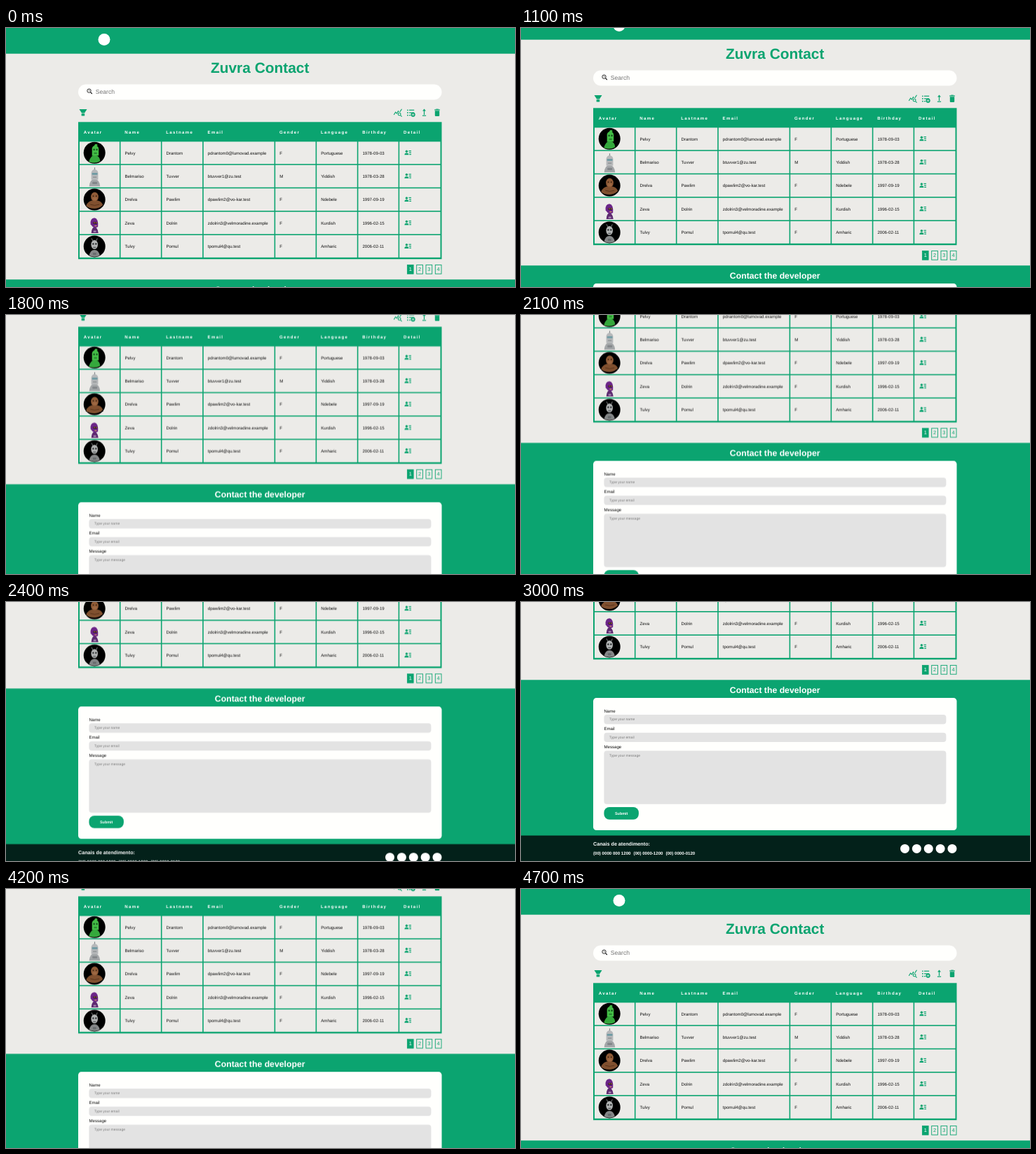
An HTML page that plays this animation: 726x370 px, repeating every 5500 ms.

```html
<!DOCTYPE html>
<html lang="en">
<head>
<meta charset="utf-8">
<title>Contact list</title>
<style>
  html, body { margin: 0; width: 100%; height: 100%; overflow: hidden; background: #ecebe8; }
  svg { display: block; width: 726px; height: 370px; overflow: hidden; }
  text { font-family: "Liberation Sans", Arial, sans-serif; text-rendering: geometricPrecision; white-space: pre; }
</style>
</head>
<body>
<svg viewBox="0 0 726 370"><g id="page"></g></svg>
<script>
const GREEN = '#0ba470', PAPER = '#ecebe8', WHITE = '#fffffd', INK = '#111';
const LEFT = 103, RIGHT = 621.5, WIDTH = RIGHT - LEFT;

const rect = (x, y, w, h, fill, r = 0, extra = '') =>
  `<rect x="${x}" y="${y}" width="${w}" height="${h}" rx="${r}" fill="${fill}" ${extra}/>`;
const oval = (x, y, rx, ry, fill) =>
  `<ellipse cx="${x}" cy="${y}" rx="${rx}" ry="${ry}" fill="${fill}"/>`;
const dot = (x, y, r, fill) => oval(x, y, r, r, fill);
const ring = (x, y, r, color, w) =>
  `<circle cx="${x}" cy="${y}" r="${r}" fill="none" stroke="${color}" stroke-width="${w}"/>`;
const fillPath = (d, fill) => `<path d="${d}" fill="${fill}"/>`;
const linePath = (d, color, w) =>
  `<path d="${d}" fill="none" stroke="${color}" stroke-width="${w}"/>`;
const text = (x, y, size, str, fill = INK, extra = '') =>
  `<text x="${x}" y="${y}" font-size="${size}" fill="${fill}" ${extra}>${str}</text>`;
const at = (x, y, content, scale = 1) =>
  `<g transform="translate(${x} ${y}) scale(${scale})">${content}</g>`;
const BOLD = 'font-weight="700" ', MID = 'text-anchor="middle"';

function header() {
  return rect(0, 0, 726, 36.7, GREEN) +
    dot(140, 16.5, 8.5, '#fff') +
    text(362.2, 64.3, 20.9, 'Zuvra Contact', GREEN, BOLD + MID);
}

function searchBar() {
  return rect(LEFT, 80.5, WIDTH, 22, WHITE, 11) +
    ring(118.5, 89.7, 2.7, INK, 0.9) +
    linePath('M120.5 91.7L122.8 94', INK, 1.1) +
    linePath('M117.5 89.3Q118.7 88.1 119.5 89.4L118.6 90.8', INK, 0.5) +
    text(127.8, 94.4, 8.6, 'Search', '#757575');
}

function toolbar() {
  const funnel = fillPath('M104.5 116H115.5L112 121.6H108Z', GREEN) +
    rect(107.6, 122.2, 4.6, 3.3, GREEN, 0.5);
  const stats = at(552.3, 114.3,
    linePath('M1.8 17.5L6 10.7L9.2 14.2L13 7.9L14.9 10.3M17.3 10.2L22.2 2.6', GREEN, 2) +
    ring(16, 16, 3.5, GREEN, 2) +
    linePath('M18.6 18.6L22.4 22.4', GREEN, 2), 0.55);
  const list = [117.3, 121, 124.7].map((y, i) =>
    dot(572.9, y, 0.9, GREEN) + rect(575, y - 0.6, i === 2 ? 2.2 : 7.2, 1.2, GREEN)).join('') +
    dot(580.6, 123.8, 3.1, GREEN) +
    linePath('M578.8 123.8H582.4M580.6 122V125.6', PAPER, 0.8);
  const arrow = fillPath('M596.5 115.6L599 118.6H594Z', GREEN) +
    rect(595.9, 118, 1.2, 6, GREEN) + rect(593.9, 124.6, 5.2, 1.2, GREEN);
  const bin = rect(611.2, 116.3, 7.6, 1.3, GREEN) + rect(613.2, 115.6, 3.6, 1, GREEN) +
    fillPath('M611.8 118.2H618.2V125Q618.2 126 617.2 126H612.8Q611.8 126 611.8 125Z', GREEN);
  return funnel + stats + list + arrow + bin;
}

// Avatars are drawn around the centre of their circle.
const avatars = [
  () => dot(0, 0, 15.5, '#000') +
    fillPath('M-8 13Q-6 4 1 3Q8 5 8 12Q1 16 -8 13Z', '#35a83c') +
    fillPath('M-3.5 4V-6Q-3 -10 1 -10.5Q6 -10 6 -5V4Z', '#43bd46') +
    oval(2.2, -11, 2, 1.6, '#43bd46') +
    dot(-0.6, -4.5, 1.2, '#154d1c') + dot(3.4, -4.5, 1.2, '#154d1c') +
    rect(-0.8, 0, 4.4, 1.2, '#1b6524', 0.6),
  () => fillPath('M-7.5 14.5Q-6.5 4 0 4Q7 4 8 14.5Z', '#a3a6a8') +
    fillPath('M-4.6 5V-5Q-4 -9 0 -10Q4.8 -9 5.2 -5V5Z', '#b6b8ba') +
    rect(-0.3, -12.5, 1.2, 3, '#85898c') +
    rect(-3.6, -4.6, 8, 2.6, '#6d9aa3', 1) + rect(-2.2, 0.8, 5.2, 1.2, '#85898b') +
    rect(-3, 8, 7, 3.4, '#83878a', 1),
  () => dot(0, 0, 15.5, '#000') +
    fillPath('M-12 9Q-9 1 0 1Q10 1 12 8Q6 13 0 13Q-8 13 -12 9Z', '#80502f') +
    oval(0.3, -4, 5.4, 6.6, '#8f5b37') + oval(0.5, -1, 3.2, 2.2, '#9d6843') +
    dot(-1.7, -5, 0.9, '#2d190c') + dot(2.6, -5, 0.9, '#2d190c') +
    linePath('M-6 7Q0 9.6 7 7', '#57331b', 1),
  () => fillPath('M-4.5 14.5Q-4 6 0 6Q4.5 6 5.5 14.5Z', '#5d2a70') +
    fillPath('M-5.5 2Q-6.5 -7 0 -7.2Q5.8 -6.5 5 5.5Q1 8 -2.5 5.5Z', '#6c2588') +
    rect(-2, -1.5, 6, 3, '#2c1236', 1.2) + dot(-0.2, -0.2, 0.8, '#e0a126') +
    dot(2.6, -0.2, 0.8, '#e0a126') + rect(0, 3.4, 3.4, 1.3, '#d59a5a', 0.6) +
    rect(-1.5, 11, 4, 2.2, '#a98bb3', 0.8),
  () => dot(0, 0, 15.5, '#000') +
    linePath('M-2.5 -8L-4.2 -11.5M2.8 -8L4 -11.5', '#8d8f90', 0.9) +
    fillPath('M-7.5 13Q-6 5 0 5Q6 5 7.5 13Q0 16.5 -7.5 13Z', '#858788') +
    oval(0, -2.5, 4.8, 6.4, '#b1b3b3') + dot(-1.8, -3.5, 1.2, '#26292b') +
    dot(2.1, -3.5, 1.2, '#26292b') + rect(-2, 0.8, 4.2, 1.2, '#55595b', 0.5) +
    rect(-2.4, 9, 5, 3.4, '#686c6e', 1)
];

const personCard = y =>
  dot(571.4, y - 1.9, 1.75, GREEN) +
  fillPath(`M568.4 ${y + 3.2}Q568.4 ${y + 0.4} 571.4 ${y + 0.4}T574.4 ${y + 3.2}Z`, GREEN) +
  [-2.5, 0, 2.5].map((d, i) => rect(574.4 + i * 0.4, y + d - 0.6, 3.6 - i * 0.4, 1.2, GREEN)).join('');

const heads = ['Avatar', 'Name', 'Lastname', 'Email', 'Gender', 'Language', 'Birthday', 'Detail'];
const textX = [110.8, 169.3, 228.3, 287.6, 390, 449, 508.2, 567];
const people = [
  ['Pelvy', 'Drantom', 'pdrantom0@lumovad.example', 'F', 'Portuguese', '1978-09-03'],
  ['Belmariso', 'Tuvver', 'btuvver1@zu.test', 'M', 'Yiddish', '1978-03-28'],
  ['Drelva', 'Pawlim', 'dpawlim2@vo-kar.test', 'F', 'Ndebele', '1997-09-19'],
  ['Zeva', 'Dolrin', 'zdolrin3@velmoradine.example', 'F', 'Kurdish', '1996-02-15'],
  ['Tulvy', 'Pomul', 'tpomul4@qu.test', 'F', 'Amharic', '2006-02-11']
];

// A green block with paper-coloured cells; the gaps become the rules.
function table() {
  const top = 134.3, bottom = 330.2, pitch = 33.4, gap = 1.6, pad = 5.8;
  let out = rect(LEFT, top, WIDTH, bottom - top, GREEN);
  heads.forEach((h, i) =>
    out += text(textX[i], 150.6, 6.13, h, '#fff', BOLD + 'letter-spacing="1.28"'));
  people.forEach((person, row) => {
    const y = 178.3 + row * pitch, h = pitch - gap;
    textX.forEach((x, i) => {
      const end = i < 7 ? textX[i + 1] - pad - gap : RIGHT - 2;
      out += rect(x - pad, y - h / 2, end - x + pad, h, PAPER);
    });
    out += at(126.2, y, avatars[row]()) + personCard(y - 0.2);
    person.forEach((cell, i) => out += text(textX[i + 1] + 0.2, y + 2.3, 6.13, cell));
  });
  return out;
}

function pager() {
  return [1, 2, 3, 4].map(n => {
    const x = 572.4 + (n - 1) * 13.3;
    return rect(x, 338.4, 8.7, 12.8, n === 1 ? GREEN : 'none', 0, `stroke="${GREEN}" stroke-width="0.9"`) +
      text(x + 4.35, 347.4, 7.4, n, n === 1 ? '#fff' : GREEN, MID);
  }).join('');
}

function contactForm() {
  const field = (label, hint, y, h) =>
    text(118.4, y - 3.3, 6.13, label) +
    rect(118.4, y, 488, h, '#e3e3e3', 4) +
    text(126, y + 8.4, 5.05, hint, '#7a7a7a');
  return rect(0, 359.3, 726, 223, GREEN) +
    text(362.2, 378.4, 12.26, 'Contact the developer', '#fff', BOLD + MID) +
    rect(LEFT, 385.1, WIDTH, 189, WHITE, 4.5) +
    field('Name', 'Type your name', 409, 13.4) +
    field('Email', 'Type your email', 434.7, 13.4) +
    field('Message', 'Type your message', 460.4, 76.4) +
    rect(118.4, 541.1, 49.5, 17.6, GREEN, 7.6) +
    text(143.2, 551.7, 5.45, 'Submit', '#fff', BOLD + MID);
}

function footer() {
  const phones = [[103, '(00) 0000 000 1200'], [160.6, '(00) 0000-1200'], [206.4, '(00) 0000-0120']];
  let out = rect(0, 581.6, 726, 38.4, '#03211a') +
    text(LEFT, 596.1, 7.18, 'Canais de atendimento:', '#fff', BOLD);
  for (const [x, number] of phones) out += text(x, 608.8, 6.13, number, '#fff', BOLD);
  for (let i = 0; i < 5; i++) out += dot(547.5 + i * 16.87, 600.4, 6.5, '#fff');
  return out;
}

const page = document.getElementById('page');
page.innerHTML = rect(0, 0, 726, 620, PAPER) + header() + searchBar() + toolbar() +
  table() + pager() + contactForm() + footer();

// Scroll stops: [ms, px]; the screen refreshes every 100 ms.
const LOOP = 5500, TICK = 100;
const stops = [
  [0, 0], [1000, 0], [1100, 20], [1800, 117.5], [2400, 235.7], [2500, 243], [2800, 248],
  [3700, 248], [3800, 239.6], [3900, 213], [4200, 123.8], [4500, 33], [4600, 9], [4700, 0], [LOOP, 0]
];

function scrollAt(t) {
  const i = Math.max(1, stops.findIndex(s => s[0] >= t));
  const [t0, y0] = stops[i - 1], [t1, y1] = stops[i];
  return y0 + (y1 - y0) * (t - t0) / (t1 - t0);
}

const frames = [];
for (let t = 0; t <= LOOP; t += TICK)
  frames.push({ offset: t / LOOP, transform: `translateY(${-scrollAt(t)}px)`, easing: 'step-end' });
page.animate(frames, { duration: LOOP, iterations: Infinity });
</script>
</body>
</html>
```
